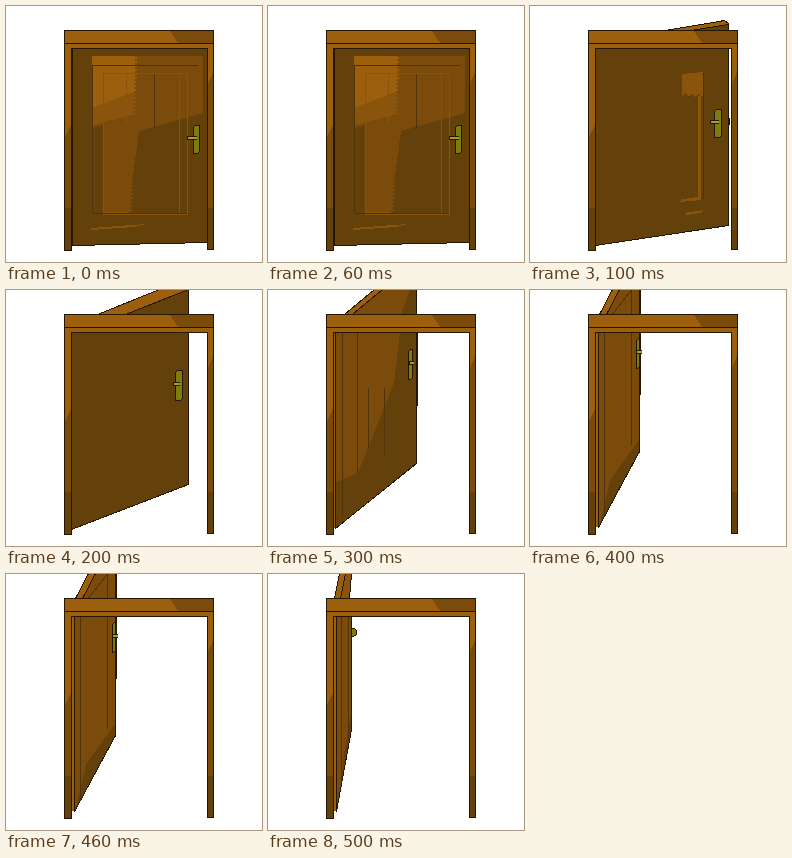
Recreate the animation shown at these times as an HTML page. Size 256x256 px, loop 0.6 s.

```html
<!DOCTYPE html>
<html lang="en">
<head>
<meta charset="utf-8">
<title>Opening door</title>
<style>
html, body { margin: 0; height: 100%; overflow: hidden; background: #fff; }
svg { display: block; width: 100vw; height: 100vh; shape-rendering: crispEdges; }
.light { fill: #9c5f0d; }
.mid { fill: #7b4b0b; }
.warm { fill: #8b540c; }
.dark { fill: #64400a; }
.brass { fill: #7c7d0c; }
.shine { fill: #a3a51c; }
.edge { stroke: #231603; }
.line { fill: none; stroke: #503207; }
.glow { fill: none; stroke: #8b540c; }
#poses g { display: none; }
#poses g.on { display: inline; }
</style>
</head>
<body>
<svg viewBox="0 0 256 256">
  <g id="poses"></g>
  <g id="frame"></g>
</svg>
<script>
const path = (cls, d) => `<path class="${cls}" d="M${d}"/>`;
const area = (cls, d) => path(cls, d + 'z');

// Door leaf from the hinge to the free side at x, whose lower corner is at y
const leaf = (x, y, cls = 'dark', hinge = 65.5, foot = 239.5) =>
  area('light', `66 42H${hinge}V${foot - 1}H66`) +
  area(cls + ' edge', `${hinge} 42.5H${x}V${y}L${hinge} ${foot}`);

// Door handle: plate at (x, y), lever reaching dx sideways
const handle = (x, y, w, h, dx) =>
  area('brass edge', `${x} ${y + 2}l2 -2H${x + w}V${y + h - 2}l-2 2H${x}`) +
  area('brass edge', `${x + w - 3} ${y + h * .4}h${dx}v3h${-dx}`) +
  area('shine', `${x + w - 3} ${y + h * .4}h${dx}v2h${-dx}`);

// Ragged edge of a reflection, running down from y to end
const ragged = (y, end) => {
  let d = '';
  for (let i = 0; y < end; i++, y += 2) d += `L${130 - y / 30 + i % 2 * 4} ${y}`;
  return d;
};

const poses = [
  leaf(201.5, 236.5, 'dark', 66.5) +
  area('mid', '86 50H197V107L133 125 122 207H97V119L86 122') +
  area('mid', `97 110${ragged(110, 206)}L122 207H97`) +
  area('warm', `86 50${ragged(50, 110)}L86 119`) +
  area('light', `86 50${ragged(50, 88)}L86 102`) +
  area('warm', '85 222L140 218 128 221 85 224') +
  area('warm', '97 206H122V209H97') +
  path('line', '86.5 207V59.5H192M148.5 67V122M87 207.5H182') +
  path('glow', '97.5 207V67.5H181.5V208.5H122M173.5 68V207M120.5 67V118') +
  handle(187.5, 119.5, 6, 28, -9),

  area('light edge', '135.5 24.5L194.5 14.5 198.5 17.5V24.5') +
  area('dark edge', '160.5 24.5L198.5 18.5V24.5') +
  leaf(198.5, 219.5) +
  area('warm', '152 68L173 66V90H170L168 88 165 91 162 87 159 91 156 87 152 90') +
  area('warm', '168 90H171V194L149 196 153 193 168 191') +
  area('warm', '154 207L174 204 170 207 156 209') +
  path('line', '173.5 67V193') +
  area('edge', '198 112h1v6h-1') +
  handle(184.5, 103.5, 7, 28, -8),

  area('light edge', '91.5 24.5L153.5 -.5H182.5V24.5') +
  area('dark edge', '119.5 24.5L182.5 -.5V24.5') +
  leaf(182.5, 194.5) +
  handle(169.5, 80.5, 7, 30, -6),

  area('light edge', '76.5 24.5L106.5 -.5H148.5V24.5') +
  area('mid edge', '84.5 24.5L114.5 -.5H148.5V24.5') +
  area('dark', '133 24L142 0H148V24') +
  path('edge', '149.5 42V116') +
  leaf(148.5, 173.5, 'mid', 67.5, 238.5) +
  area('dark', '132 43H148V173L68 237V192L90 183 110 133 126 93') +
  path('line', '74.5 43V228M89.5 43V183M100.5 98V158M116.5 98V165') +
  handle(140.5, 59.5, 4, 30, 4),

  path('edge', '110.5 0V105') +
  area('light edge', '69.5 24.5L82.5 -.5H109.5V24.5') +
  area('mid edge', '76.5 24.5L89.5 -.5H109.5V24.5') +
  path('line', '82.5 24L101.5 0V24') +
  leaf(109.5, 161.5, 'mid', 68.5, 237.5) +
  area('dark', '70 234L80 190 109 150V161') +
  path('line', '74.5 43V226M101.5 43V155') +
  handle(106.5, 48.5, 3, 30, 5),

  area('light edge', '66.5 24.5L71.5 -.5H83.5L80.5 24.5') +
  area('warm edge', '72.5 24.5L77.5 -.5H83.5L81.5 24.5') +
  leaf(83.5, 155.5, 'mid', 68.5, 237.5) +
  area('dark', '72 214L76 180 83 140V155') +
  path('line', '73.5 43V208M80.5 43V165') +
  area('brass edge', '83.5 54.5h3l2 2v4l-3 2h-2')
];

const group = document.getElementById('poses');
group.innerHTML = poses.map(p => `<g>${p}</g>`).join('');

document.getElementById('frame').innerHTML =
  area('light edge', '58.5 37.5H207.5V243.5H201.5V42.5H65.5V244.5H58.5') +
  area('mid', '59 131L65 119V202H59') +
  area('dark', '59 202H65V244H59') +
  area('mid', '202 78L207 66V202H202') +
  area('dark', '202 202H207V243H202') +
  area('light edge', '58.5 24.5H207.5V37.5H58.5') +
  area('mid', '164 25H207V37H172');

function show() {
  const step = Math.floor(performance.now() % 600 / 100);
  [...group.children].forEach((g, i) => g.classList.toggle('on', i === step));
  requestAnimationFrame(show);
}
show();
</script>
</body>
</html>
```
